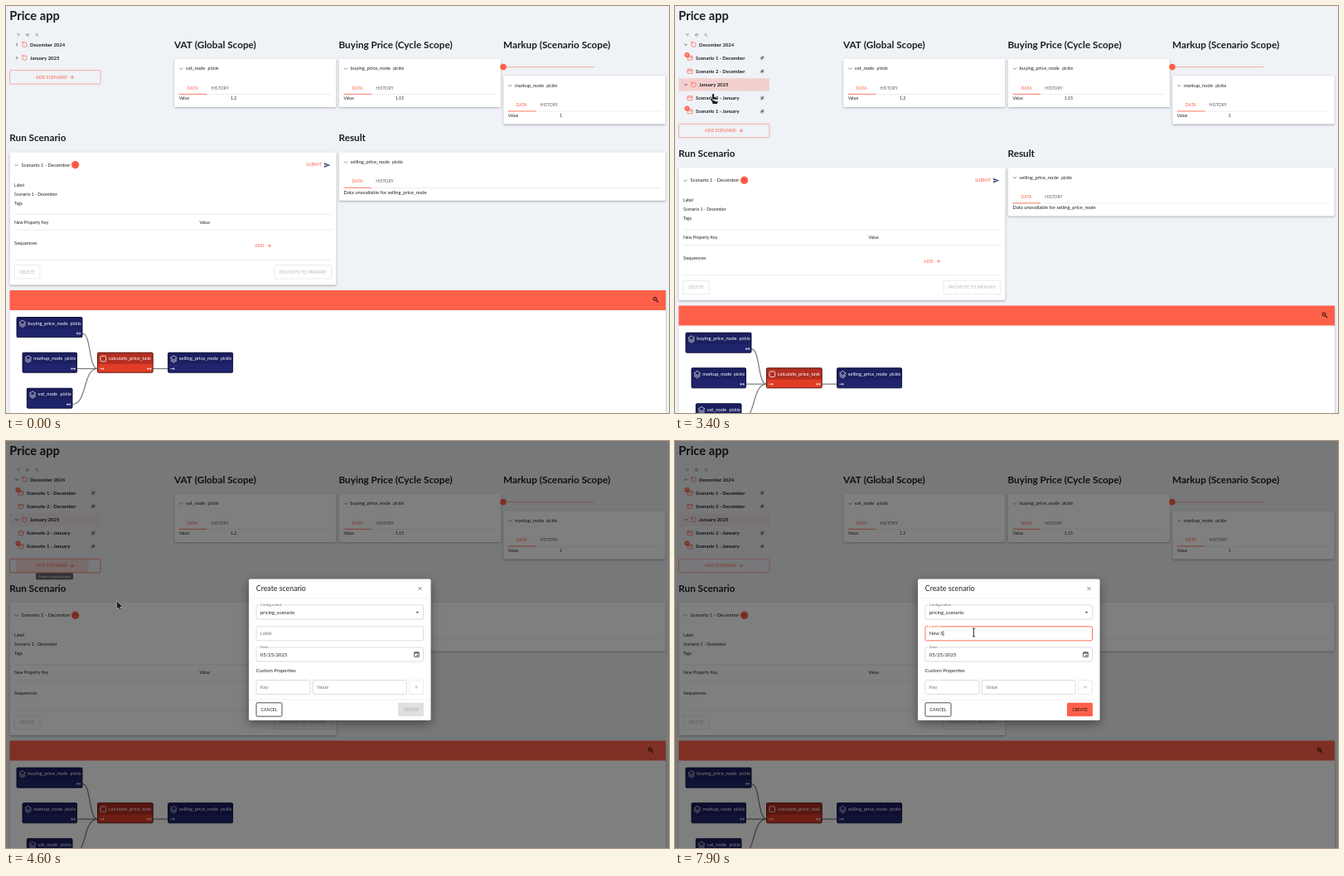
Write an HTML page with a canvas that moves like this. It is 800 px wide and 491 px high and loops after 8 s.

```html
<!DOCTYPE html>
<html lang="en">
<head>
<meta charset="utf-8">
<title>Price app</title>
<style>
html, body { margin: 0; width: 100%; height: 100%; overflow: hidden; background: #eff2f6; }
canvas { display: block; width: 100vw; height: 100vh; }
</style>
</head>
<body>
<canvas id="stage"></canvas>
<script>
const W = 800, H = 491, LOOP = 8000;
const ZOOM = 11 / 30; // interface pixels to stage pixels
const RED = '#ff6049', INK = '#242424', RULE = '#dcdde0';
const canvas = document.getElementById('stage');
const ctx = canvas.getContext('2d');
const dpr = window.devicePixelRatio || 1;
canvas.width = W * dpr;
canvas.height = H * dpr;

const clamp = v => Math.max(0, Math.min(1, v));
const ease = v => { v = clamp(v); return v * v * (3 - 2 * v); };
const mix = (a, b, p) => a + (b - a) * p;

// size is in interface pixels, y is the middle of the capitals
function text(str, x, y, size = 16, color = INK, align = 'left', weight = 400) {
  ctx.save();
  ctx.translate(x, y + size * ZOOM * 0.35);
  ctx.scale(ZOOM, ZOOM);
  ctx.font = `${weight} ${size}px Lato, sans-serif`;
  ctx.textAlign = align;
  ctx.fillStyle = color;
  ctx.fillText(str, 0, 0);
  const w = ctx.measureText(str).width * ZOOM;
  ctx.restore();
  return w;
}
const bold = (str, x, y, size) => text(str, x, y, size, '#1c1e22', 'left', 700);

function box(x, y, w, h, r, fill, stroke, lw = 0.6) {
  ctx.beginPath();
  ctx.roundRect(x, y, w, h, r);
  if (fill) { ctx.fillStyle = fill; ctx.fill(); }
  if (stroke) { ctx.strokeStyle = stroke; ctx.lineWidth = lw; ctx.stroke(); }
}

function line(pts, color, lw = 0.6, close = false) {
  ctx.beginPath();
  for (let i = 0; i < pts.length; i += 2) ctx.lineTo(pts[i], pts[i + 1]);
  if (close) ctx.closePath();
  ctx.strokeStyle = color;
  ctx.lineWidth = lw;
  ctx.stroke();
}

function poly(pts, fill) {
  ctx.beginPath();
  for (let i = 0; i < pts.length; i += 2) ctx.lineTo(pts[i], pts[i + 1]);
  ctx.closePath();
  ctx.fillStyle = fill;
  ctx.fill();
}

function disc(x, y, r, fill, stroke, lw = 0.6) {
  ctx.beginPath();
  ctx.arc(x, y, r, 0, 7);
  if (fill) { ctx.fillStyle = fill; ctx.fill(); }
  if (stroke) { ctx.strokeStyle = stroke; ctx.lineWidth = lw; ctx.stroke(); }
}

function plus(x, y, r, color) {
  line([x - r, y, x + r, y], color, 0.7);
  line([x, y - r, x, y + r], color, 0.7);
}

function at(x, y, draw) {
  ctx.save();
  ctx.translate(x, y);
  draw();
  ctx.restore();
}

function panel(x, y, w, h, r = 1.5, blur = 2.5, drop = 0.9, alpha = 0.32) {
  ctx.save();
  ctx.shadowColor = `rgba(0,0,0,${alpha})`;
  ctx.shadowBlur = blur * dpr;
  ctx.shadowOffsetY = drop * dpr;
  box(x, y, w, h, r, '#fff');
  ctx.restore();
}

const chevron = (x, y) => line([x - 2, y - 1, x, y + 1, x + 2, y - 1], '#444', 0.6);

function magnifier(x, y, r, color, lw) {
  disc(x - r * 0.3, y - r * 0.3, r * 0.65, null, color, lw);
  line([x + r * 0.2, y + r * 0.2, x + r, y + r], color, lw * 1.2);
}

function nodeCard(x, y, w, name, value, message) {
  panel(x, y, w, 58.3);
  chevron(x + 8, y + 12);
  const nw = text(name, x + 13.6, y + 11.8);
  text('pickle', x + 16.8 + nw, y + 12, 14);
  text('DATA', x + 22, y + 35.2, 14, RED, 'center');
  text('HISTORY', x + 55, y + 35.2, 14, '#666', 'center');
  line([x + 5.5, y + 43, x + w - 6, y + 43], RULE, 0.5);
  line([x + 5.5, y + 42.7, x + 39, y + 42.7], RED, 0.8);
  if (message) {
    text(message, x + 5.5, y + 48.2);
  } else {
    text('Value', x + 5.5, y + 48, 14);
    text(value, x + 67.8, y + 48, 14);
  }
}

function send(x, y) {
  poly([x - 3.5, y - 3, x + 4, y, x - 3.5, y + 3, x - 3.5, y + 0.7, x + 1, y, x - 3.5, y - 0.7], '#4b5a86');
}

function scenarioCard() {
  panel(4.5, 176.5, 394, 160);
  chevron(12.5, 192);
  text('Scenario 1 - December', 18.5, 191.5);
  disc(83.6, 191.6, 4.7, RED);
  line([82.3, 193, 82.3, 190.3, 85, 190.3, 85, 192, 82.3, 192], '#b8402f', 0.5);
  text('SUBMIT', 381, 191.5, 14, RED, 'right');
  send(387.5, 192);
  text('Label', 10, 216, 14);
  text('Scenario 1 - December', 10, 227, 14);
  text('Tags', 10, 238, 14);
  text('New Property Key', 10, 261, 14);
  text('Value', 233.5, 261, 14);
  text('Sequences', 10, 285.6);
  for (const y of [251.2, 270, 306.2]) line([10, y, 393, y], RULE, 0.6);
  text('ADD', 300, 289.3, 14, RED);
  plus(318, 289.3, 2.1, RED);
  box(10, 312.6, 31, 16.4, 1.4, null, '#dcdcdc');
  text('DELETE', 25.5, 320.8, 14, '#b9b9b9', 'center');
  box(324, 312.6, 69, 16.4, 1.4, null, '#dcdcdc');
  text('PROMOTE TO PRIMARY', 358.5, 320.8, 14, '#b9b9b9', 'center');
}

function port(x, y, both) {
  line([x - 2.4, y, x + 2.4, y], '#fff', 0.7);
  line([x + 1, y - 1.3, x + 2.5, y, x + 1, y + 1.3], '#fff', 0.7);
  if (both) line([x - 1, y - 1.3, x - 2.5, y, x - 1, y + 1.3], '#fff', 0.7);
}

function graphNode(x, y, w, name, opts) {
  const task = opts.task;
  box(x, y, w, 24, 1.2, task ? '#e03d24' : '#20246c');
  box(x, y, w, 13.6, [1.2, 1.2, 0, 0], task ? '#b32f22' : '#1c1f60');
  box(x, y, w, 24, 1.2, null, task ? '#4a120c' : '#0b0d30', 0.9);
  const ix = x + 6.8, iy = y + 7.4;
  if (task) {
    box(ix - 3.3, iy - 3.3, 6.6, 6.6, 1.4, null, '#fff', 0.8);
  } else {
    line([ix, iy - 3.8, ix + 3.8, iy - 1.2, ix, iy + 1.4, ix - 3.8, iy - 1.2], '#fff', 0.7, true);
    line([ix - 3.8, iy + 0.8, ix, iy + 3.2, ix + 3.8, iy + 0.8], '#fff', 0.7);
    line([ix - 3.8, iy + 2.4, ix, iy + 4.8, ix + 3.8, iy + 2.4], '#fff', 0.5);
  }
  text(name, x + 13.2, y + 7.2, 16, '#fff');
  if (!task) text('pickle', x + w - 1.4, y + 7.4, 14, '#fff', 'right');
  if (opts.in) port(x + 5.2, y + 19.4, false);
  if (opts.out) port(x + w - 4.4, y + 19.4, true);
}

function link(x1, y1, x2, y2) {
  const bend = (x2 - x1) * 0.6;
  ctx.beginPath();
  ctx.moveTo(x1, y1);
  ctx.bezierCurveTo(x1 + bend, y1, x2 - bend, y2, x2, y2);
  ctx.strokeStyle = '#777';
  ctx.lineWidth = 1.2;
  ctx.stroke();
}

function graph(zoomX) {
  panel(4.5, 343, 791.5, 200, 0);
  box(4.5, 343, 791.5, 24, 0, RED);
  magnifier(zoomX, 354.3, 3.2, '#3a1610', 1);
  line([zoomX - 2.2, 353.3, zoomX + 0.2, 353.3], '#3a1610', 0.6);
  link(92, 395, 110.5, 437.5);
  link(85.5, 437.5, 110.5, 437.5);
  link(80, 480.5, 110.5, 437.5);
  link(177, 437.5, 195.5, 437.5);
  graphNode(13, 375.6, 79, 'buying_price_node', { out: true });
  graphNode(20, 418.2, 65.5, 'markup_node', { out: true });
  graphNode(25.3, 461.2, 54.7, 'vat_node', { out: true });
  graphNode(110.5, 418.2, 66.7, 'calculate_price_task', { task: true, in: true, out: true });
  graphNode(195.6, 418.2, 78, 'selling_price_node', { in: true });
}

const OPEN_DEC = 1950, OPEN_JAN = 2950, DIALOG = 4300, FOCUS = 6500;
const months = [
  { name: 'December 2024', start: OPEN_DEC, kids: ['Scenario 1 - December', 'Scenario 2 - December'], primary: 0 },
  { name: 'January 2025', start: OPEN_JAN, kids: ['Scenario 2 - January', 'Scenario 1 - January'], primary: 1 }
];

function rowBack(y, hover, pink) {
  if (pink) box(4.5, y - 7.6, 109.5, 15.2, 0.8, `rgba(255,96,73,${pink})`);
  else if (hover && Math.abs(hover.y - y) < 7.6 && hover.x < 114) box(4.5, y - 7.6, 109.5, 15.2, 0.8, 'rgba(0,0,0,0.06)');
}

function cycleIcon(x, y) {
  box(x - 2.6, y - 2.4, 5.2, 5, 1.5, null, RED, 0.7);
  line([x - 3.4, y - 2.8, x - 1, y - 2.8], RED, 0.8);
}

function child(name, y, primary, hover) {
  rowBack(y, hover, 0);
  box(15, y - 2.4, 6, 5, 0.6, null, RED, 0.7);
  line([15, y - 0.8, 21, y - 0.8], RED, 0.8);
  if (primary) {
    disc(14.5, y - 3.6, 3, RED);
    line([13.6, y - 2.4, 13.6, y - 4.8, 15.4, y - 4.8, 15.4, y - 3.6, 13.6, y - 3.6], '#fff', 0.35);
  }
  bold(name, 25, y, 16);
  disc(105.2, y, 2.9, '#d2d4d8');
  line([103.9, y + 1.3, 106.6, y - 1.4], '#333', 1.2);
}

function tree(t, hover) {
  line([13, 33.8, 17, 33.8], '#777', 0.5);
  line([13.8, 35, 16.2, 35], '#777', 0.5);
  line([14.5, 36.2, 15.5, 36.2], '#777', 0.5);
  disc(26, 35, 1.5, null, '#777', 0.5);
  line([24, 35, 28, 34], '#777', 0.5);
  magnifier(37.5, 35, 1.9, '#777', 0.5);
  let y = 46.5;
  months.forEach((m, i) => {
    const p = ease((t - m.start) / 300);
    const last = i ? LOOP : OPEN_JAN;
    const chosen = t >= m.start && t < last;
    rowBack(y, hover, chosen ? (i && t > 3700 ? 0.08 : 0.23) : 0);
    at(13, y, () => {
      ctx.rotate(p * Math.PI / 2);
      line([-0.8, -1.7, 0.9, 0, -0.8, 1.7], '#333', 0.8);
    });
    cycleIcon(22.5, y);
    bold(m.name, 29, y, 16);
    if (p > 0) {
      ctx.save();
      ctx.beginPath();
      ctx.rect(0, y + 7.8, 200, 32.3 * p);
      ctx.clip();
      m.kids.forEach((k, j) => child(k, y + 16.1 * (j + 1), j === m.primary, hover));
      ctx.restore();
    }
    y += 16.1 + 32.3 * p;
  });
  return y + 7.2;
}

function addButton(y, t) {
  const fade = 1 - clamp((t - 4500) / 400);
  if (t > 4150 && fade > 0) {
    ctx.save();
    ctx.beginPath();
    ctx.roundRect(4.5, y - 8.3, 109.5, 16.6, 1.5);
    ctx.clip();
    disc(56, y, 44 * ease((t - 4150) / 250), `rgba(255,96,73,${0.25 * fade})`);
    ctx.restore();
  }
  box(4.5, y - 8.3, 109.5, 16.6, 1.5, null, t > 4000 && t < 4900 ? RED : 'rgba(255,96,73,0.65)', 0.7);
  text('ADD SCENARIO', 36, y, 14, RED);
  plus(80, y, 2.3, RED);
  const tip = ease((t - 3950) / 150) * (1 - ease((t - 4600) / 250));
  if (tip > 0) {
    ctx.globalAlpha = tip;
    box(36, y + 8.8, 45, 8, 1.2, 'rgba(90,92,96,0.92)');
    text('Create a new Scenario', 58.5, y + 12.8, 11, '#fff', 'center');
    ctx.globalAlpha = 1;
  }
}

function page(t, hover) {
  ctx.fillStyle = '#eff2f6';
  ctx.fillRect(0, 0, W, H);
  bold('Price app', 4.2, 11.8, 40);
  bold('VAT (Global Scope)', 203, 46.5, 32);
  bold('Buying Price (Cycle Scope)', 401.5, 46.5, 32);
  bold('Markup (Scenario Scope)', 600, 46.5, 32);
  nodeCard(203.2, 63.6, 195, 'vat_node', '1.2');
  nodeCard(402, 63.6, 195, 'buying_price_node', '1.15');
  nodeCard(600.3, 84.2, 195.4, 'markup_node', '1');
  line([600, 73.6, 710, 73.6], '#f9a698', 0.9);
  disc(600, 73.6, 3.8, RED);
  const btn = tree(t, hover);
  ctx.save();
  ctx.translate(0, Math.max(0, btn - 131.9));
  bold('Run Scenario', 4.2, 159, 32);
  bold('Result', 401.5, 159, 32);
  scenarioCard();
  nodeCard(402, 176.5, 393.7, 'selling_price_node', '', 'Data unavailable for selling_price_node');
  graph(t < DIALOG ? 784 : 778);
  ctx.restore();
  addButton(btn, t);
}

function field(x, y, w, color = '#c4c4c4', lw = 0.6) {
  box(x, y, w, 17, 1.5, null, color, lw);
}

function floatLabel(str, x, y, size, color) {
  if (size < 15) {
    ctx.fillStyle = '#fff';
    ctx.fillRect(x - 1, y - 1.5, str.length * 2.1 + 1.5, 3);
  }
  text(str, x, y, size, color);
}

const KEYS = [6900, 7100, 7300, 7500, 7700];

function labelField(t) {
  const p = ease((t - FOCUS) / 180);
  const focused = t >= FOCUS, hovered = t > 5250;
  field(302, 223.8, 201.5, focused ? RED : hovered ? '#2a2a2a' : '#c4c4c4', focused || hovered ? 0.9 : 0.6);
  floatLabel('Label', 306.8, mix(232.3, 223.7, p), mix(16, 12, p), focused ? RED : '#777');
  if (!focused) return;
  const n = KEYS.filter(k => t >= k).length;
  const w = text('New S'.slice(0, n), 306.8, 232.3);
  const since = t - (n ? KEYS[n - 1] : FOCUS);
  if (since % 1000 < 500) line([307.2 + w, 229, 307.2 + w, 235.6], '#111', 0.6);
}

function dialog(t) {
  const o = clamp((t - DIALOG) / 200);
  if (!o) return;
  ctx.fillStyle = `rgba(0,0,0,${0.5 * o})`;
  ctx.fillRect(0, 0, W, H);
  ctx.globalAlpha = o;
  panel(293, 166.5, 219.6, 170.5, 1.8, 12, 4, 0.4);
  text('Create scenario', 301.8, 178, 24);
  line([497.4, 175.9, 501.6, 180.1], '#555', 0.7);
  line([497.4, 180.1, 501.6, 175.9], '#555', 0.7);
  for (const y of [190, 312]) line([293, y, 512.6, y], RULE, 0.5);

  field(302, 198, 201.5);
  floatLabel('Configuration', 306.8, 197.9, 12, '#666');
  text('pricing_scenario', 306.8, 206.8);
  poly([494.6, 206, 498.4, 206, 496.5, 208], '#555');

  labelField(t);

  field(302, 249, 201.5);
  floatLabel('Date', 306.8, 248.6, 12, '#666');
  text('05/25/2025', 306.8, 257.5);
  box(492.6, 254.8, 5.8, 5.8, 0.6, null, '#444', 0.8);
  line([492.6, 255.8, 498.4, 255.8], '#444', 1.3);
  box(495.6, 258, 1.7, 1.7, 0, '#444');

  text('Custom Properties', 301.8, 276.8);
  field(302, 288.5, 65);
  text('Key', 306.8, 297, 16, '#777');
  field(370.3, 288.5, 113);
  text('Value', 375, 297, 16, '#777');
  box(486.8, 288.5, 16.7, 17, 1.5, null, '#dedede');
  plus(495.1, 297, 2.3, '#b5b5b5');

  box(302, 315.8, 31, 16.4, 1.5, null, '#222', 0.8);
  text('CANCEL', 317.5, 324, 14, INK, 'center');
  const ready = t >= KEYS[0];
  box(473, 315.8, 31, 16.4, 1.5, ready ? RED : '#e0e0e0');
  text('CREATE', 488.5, 324, 14, ready ? '#2a120e' : '#a8a8a8', 'center');
  ctx.globalAlpha = 1;
}

// time, x, y
const PATH = [
  [1050, 150, 118], [1250, 104, 74], [1350, 92, 64], [1500, 85, 44.5], [1800, 58, 46],
  [2050, 56, 47], [2400, 57, 92], [2600, 57, 98.7], [2850, 50, 96], [3050, 48, 96],
  [3300, 47, 100], [3400, 46, 106], [3800, 56, 140], [4000, 60, 149], [4250, 62, 152],
  [4400, 66.5, 174.5], [4800, 200, 212], [5300, 352, 230], [5600, 360.5, 231]
];

function pointer(t) {
  if (t < PATH[0][0]) return null;
  const i = PATH.findIndex(k => k[0] > t);
  if (i < 0) return { x: 360.5, y: 231 };
  const a = PATH[i - 1], b = PATH[i];
  const p = ease((t - a[0]) / (b[0] - a[0]));
  return { x: mix(a[1], b[1], p), y: mix(a[2], b[2], p) };
}

function hand() {
  ctx.beginPath();
  ctx.roundRect(-1, 0, 2.2, 8, 1.1);
  ctx.roundRect(1, 3.8, 2, 5, 1);
  ctx.roundRect(2.8, 4.4, 1.9, 5, 0.9);
  ctx.roundRect(4.4, 5, 1.6, 4, 0.8);
  ctx.moveTo(-1, 6.5);
  ctx.lineTo(-2.6, 5.4);
  ctx.lineTo(-3.4, 6.4);
  ctx.lineTo(-0.8, 10);
  ctx.lineTo(-0.6, 12);
  ctx.lineTo(4.9, 12);
  ctx.lineTo(6, 8);
  ctx.lineTo(6, 6.5);
  ctx.closePath();
  ctx.strokeStyle = 'rgba(255,255,255,0.75)';
  ctx.lineWidth = 0.9;
  ctx.stroke();
  ctx.fillStyle = '#1b1b1b';
  ctx.fill();
}

function arrow() {
  const pts = [0, 0, 0, 9, 2.1, 7.1, 3.6, 10.3, 5, 9.7, 3.6, 6.6, 6.5, 6.4];
  line(pts, 'rgba(255,255,255,0.75)', 0.9, true);
  poly(pts, '#1b1b1b');
}

function beam() {
  line([0, -4.8, 0, 4.8], '#222', 0.9);
  for (const y of [-4.9, 4.9]) line([-1.8, y, 1.8, y], '#222', 0.8);
}

function frame(now) {
  const t = now % LOOP;
  ctx.setTransform(dpr, 0, 0, dpr, 0, 0);
  page(t, t < DIALOG ? pointer(t - 150) : null);
  dialog(t);
  const p = pointer(t);
  if (p) at(p.x, p.y, t < 1250 ? arrow : t < 4330 ? hand : t < 5250 ? arrow : beam);
}

const begin = performance.now();
function tick() {
  frame(performance.now() - begin);
  requestAnimationFrame(tick);
}
tick();
</script>
</body>
</html>
```
